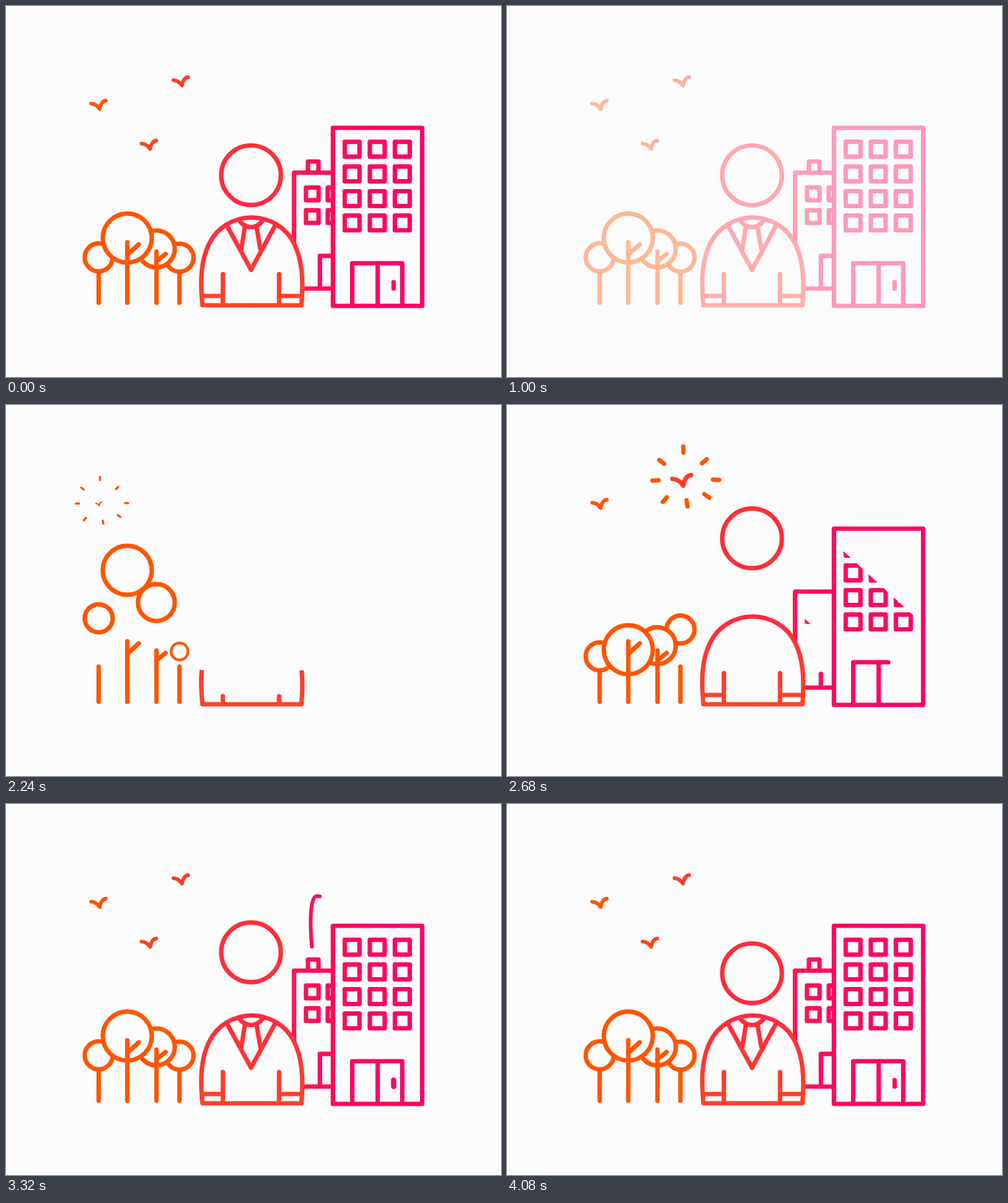
An HTML page with a canvas for the animation above (4280 ms loop, 800 by 600 pixels).

```html
<!DOCTYPE html>
<html lang="en">
<head>
<meta charset="utf-8">
<title>Park, man and city</title>
<style>
html, body { margin: 0; height: 100%; overflow: hidden; background: #fcfcfc; }
canvas { display: block; }
</style>
</head>
<body>
<canvas id="stage" width="800" height="600"></canvas>
<script>
const LOOP = 4280, BG = '#fcfcfc', W = 7.2;
const ctx = document.getElementById('stage').getContext('2d');

const ramp = (t, start, span) => Math.min(1, Math.max(0, (t - start) / span));
const inOut = p => p < .5 ? 2 * p * p : 1 - 2 * (1 - p) ** 2;
const cubicInOut = p => p < .5 ? 4 * p ** 3 : 1 - 4 * (1 - p) ** 3;
const cubicOut = p => 1 - (1 - p) ** 3;

function gradient(x1, y1, x2, y2, ...stops) {
  const g = ctx.createLinearGradient(x1, y1, x2, y2);
  stops.forEach(([at, color]) => g.addColorStop(at, color));
  return g;
}
const ORANGE = '#ff5500';
const BIRD = gradient(140, 0, 297, 0, [0, ORANGE], [1, '#ff3a2c']);
const MAN = gradient(0, 222, 0, 486, [0, '#ff2f36'], [.45, '#ff2a40'], [1, '#ff4328']);
const CITY = gradient(463, 0, 676, 0, [0, '#ff174c'], [.3, '#ff0860'], [1, '#ff0068']);

// Measured paths, so that a part of a stroke can be drawn
const cache = new Map();
function shape(d) {
  if (!cache.has(d)) {
    const el = document.createElementNS('http://www.w3.org/2000/svg', 'path');
    el.setAttribute('d', d);
    cache.set(d, { path: new Path2D(d), length: el.getTotalLength() });
  }
  return cache.get(d);
}
function trace(d, color, to = 1, from = 0, cap = 'round', width = W) {
  if (to <= 0 || from >= to) return;
  const { path, length } = shape(d);
  ctx.lineCap = cap;
  ctx.lineWidth = width;
  ctx.strokeStyle = color;
  if (to < 1 || from > 0) {
    ctx.setLineDash([Math.max(.01, (to - from) * length), length * 2]);
    ctx.lineDashOffset = -from * length;
  }
  ctx.stroke(path);
  ctx.setLineDash([]);
  ctx.lineDashOffset = 0;
}

// Jump height: up to 1, down past the rest position, back to 0
function hop(age) {
  if (age < 420) return inOut(ramp(age, 0, 320));
  if (age < 800) return 1 - 1.19 * inOut(ramp(age, 420, 380));
  return -.19 * (1 - inOut(ramp(age, 800, 120)));
}

// A disc that grows from its lowest point while it jumps
function ball(x, y, r, color, age, height, slow = 1) {
  const s = ramp(age, 0, 200);
  if (!s) return;
  const bottom = y + r + W / 2 - hop(age / slow) * height;
  ctx.beginPath();
  ctx.arc(x, bottom - s * (r + W / 2), s * r, 0, 7);
  ctx.fillStyle = BG;
  ctx.fill();
  ctx.lineWidth = W * s;
  ctx.strokeStyle = color;
  ctx.stroke();
}

function trunk(x, top, t, start, span, twig) {
  trace(`M${x} 480V${top}`, ORANGE, cubicInOut(ramp(t, start, span)));
  if (twig) trace(twig, ORANGE, ramp(t, start + 280, 160));
}

function trees(t) {
  const crown = (x, y, r, i) => ball(x, y, r, ORANGE, t - 1760 - i * 120, 2.5 * (r + W / 2));
  trunk(149.8, 423, t, 1440, 350);
  crown(149.8, 406.5, 22.6, 0);
  trunk(280.3, 423, t, 1775, 350);
  crown(280.5, 407, 22.6, 3);
  crown(243, 392.8, 29.8, 2);
  trunk(243.2, 397, t, 1727, 350, 'M243.2 413L258 401');
  crown(196, 375.2, 39.6, 1);
  trunk(196, 382, t, 1660, 350, 'M196 402.5L214.5 385.5');
}

const RAYS = [[0, -47], [34, -28], [53, 2], [38, 28], [6, 40], [-30, 34], [-45, 3], [-35, -27]];
function bird(dx, dy, age) {
  const grow = ramp(age, 0, 280), size = grow - ramp(age, 300, 140);
  if (size > 0) {
    ctx.lineCap = 'round';
    ctx.lineWidth = 7 * size;
    ctx.strokeStyle = ORANGE;
    ctx.beginPath();
    for (const [x, y] of RAYS) {
      const k = .62 + .38 * grow, half = 5 * size / Math.hypot(x, y);
      ctx.moveTo(152 + dx + x * (k - half), 157 + dy + y * (k - half));
      ctx.lineTo(152 + dx + x * (k + half), 157 + dy + y * (k + half));
    }
    ctx.stroke();
  }
  const s = 1.25 * ramp(age, 80, 200) - .25 * inOut(ramp(age, 280, 140));
  if (!s) return;
  const px = n => n * s;
  const X = 150 + dx, Y = 160 + dy;
  ctx.beginPath();
  ctx.moveTo(X - px(12.5), Y - px(2));
  ctx.quadraticCurveTo(X - px(4), Y - px(1.5), X + px(1.5), Y + px(6.8));
  ctx.quadraticCurveTo(X + px(3.5), Y - px(6), X + px(11.5), Y - px(7));
  ctx.lineCap = 'round';
  ctx.lineWidth = 5.8 * s;
  ctx.strokeStyle = BIRD;
  ctx.stroke();
}

function man(t) {
  const left = 'M397 484H317.5C313 440 316 410 328 385C341 358 368 342 397 342';
  const right = 'M397 484H477.5C481 440 478 410 466 385C453 358 426 342 397 342';
  const p = inOut(ramp(t, 2100, 280));
  if (p) {
    ctx.fillStyle = BG;
    ctx.fill(shape(left).path);
    ctx.fill(shape(right).path);
  }
  const cap = p < 1 ? 'butt' : 'round';
  trace(left, MAN, p, 0, cap);
  trace(right, MAN, p, 0, cap);

  const arm = inOut(ramp(t, 2160, 240)), cuff = ramp(t, 2340, 200);
  trace('M350.5 482V433.5', MAN, arm);
  trace('M441.3 482V433.5', MAN, arm);
  trace('M350.5 469H317', MAN, cuff);
  trace('M441.3 469H478', MAN, cuff);

  const lapel = inOut(ramp(t, 2740, 300)), tie = ramp(t, 2960, 200);
  trace('M356.5 354L396 426.5', MAN, lapel);
  trace('M435.5 354L396 426.5', MAN, lapel);
  trace('M376.5 346Q384 357.5 396 357.5Q408 357.5 415.5 346', MAN, ramp(t, 2860, 200));
  trace('M386 357.5L380.3 393', MAN, tie);
  trace('M405 357.5L411 393', MAN, tie);
  ball(396, 273.7, 48.2, MAN, t - 2433, 100, 1.43);
}

// Square panes uncovered from the lower left to the upper right
function panes(xs, ys, size, p) {
  if (!p) return;
  const half = W / 2, x = xs[0] - half, bottom = ys[ys.length - 1] + size + half;
  const w = xs[xs.length - 1] + size + half - x, h = bottom - ys[0] + half;
  const reach = p * (h + .92 * w);
  ctx.save();
  ctx.beginPath();
  ctx.moveTo(x, bottom);
  ctx.lineTo(x, bottom - reach);
  ctx.lineTo(x + reach / .92, bottom);
  ctx.clip();
  ctx.lineWidth = W;
  ctx.strokeStyle = CITY;
  for (const px of xs) for (const py of ys) ctx.strokeRect(px, py, size, size);
  ctx.restore();
}

function block(x, bottom, w, h, p) {
  if (!p) return;
  const args = [x, bottom - h * p, w, h * p];
  ctx.fillStyle = BG;
  ctx.fillRect(...args);
  ctx.lineWidth = W;
  ctx.strokeStyle = CITY;
  ctx.strokeRect(...args);
}

function city(t) {
  const smoke = 'M495.5 240C491 205 490 150 502 149C512 148.500 516 155 515 163'
    + 'C513 173 501 171 499 152C497 130 505 105 502 76';
  trace(smoke, CITY, ramp(t, 3130, 430), ramp(t, 3290, 730), 'round', 6);

  const stack = inOut(ramp(t, 2840, 220));
  if (stack) block(488, 269.5, 17, 18, stack);
  block(465.500, 457, 63, 187.500, cubicOut(ramp(t, 2459, 500)));
  panes([484.7, 520], [293.6, 330.4], 20.500, ramp(t, 2652, 400));
  trace('M507.3 457V404.2H528', CITY, inOut(ramp(t, 2580, 260)));

  block(528.400, 485, 144.200, 288, cubicOut(ramp(t, 2290, 500)));
  panes([547.3, 588, 628.5], [219.6, 259.600, 299.5, 338.8], 24, ramp(t, 2480, 392));
  trace('M559.6 485V416H640.4V485', CITY, ramp(t, 2460, 385));
  trace('M600.7 485V416', CITY, ramp(t, 2420, 240));
  const knob = ramp(t, 3200, 100);
  trace('M626.5 457V446.5', CITY, knob, 0, 'round', W + 1.200 * (knob - ramp(t, 3320, 80)));
}

function draw(now) {
  const t = now % LOOP, fading = t < 1300;
  const scene = fading ? LOOP : t;
  ctx.lineJoin = 'round';
  ctx.fillStyle = BG;
  ctx.fillRect(0, 0, 800, 600);
  city(scene);
  man(scene);
  trees(scene);
  bird(0, 0, scene - 2100);
  bird(133, -38, scene - 2400);
  bird(81.5, 64.5, scene - 2700);
  if (fading) {
    ctx.globalAlpha = ramp(t, 580, 700);
    ctx.fillStyle = BG;
    ctx.fillRect(0, 0, 800, 600);
    ctx.globalAlpha = 1;
  }
}

const begin = performance.now();
function tick() {
  draw(performance.now() - begin);
  requestAnimationFrame(tick);
}
tick();
</script>
</body>
</html>
```
